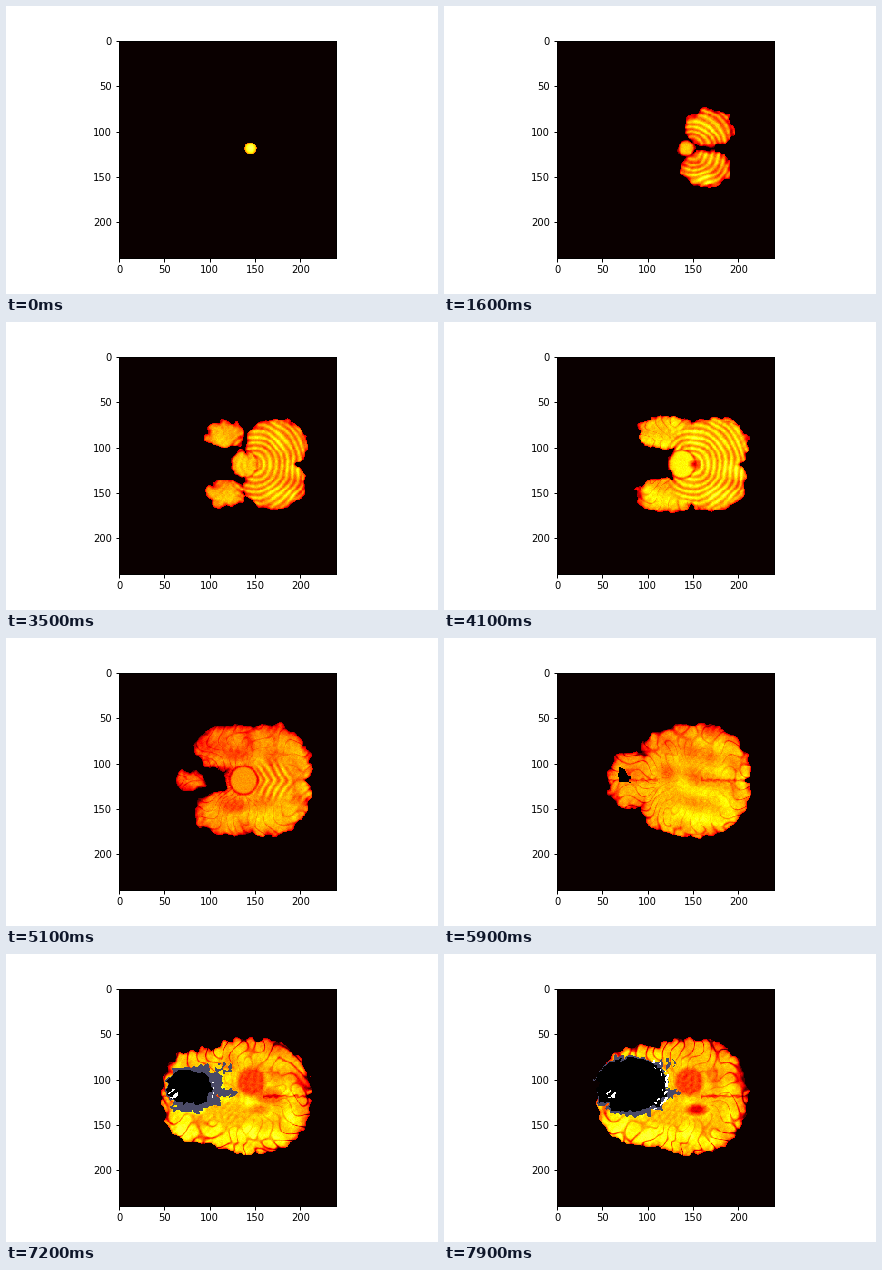
A matplotlib script that plays this animation: 432 px wide and 288 px high, repeating every 8 s.

```python
import numpy as np
import matplotlib.pyplot as plt
from matplotlib.animation import FuncAnimation

FRAMES, SIZE = 80, 240
LEFT, TOP, SCALE = 112.68, 34.56, 0.906  # image position on the stage
MID = 142.5                              # row of the midline
TAU = 2 * np.pi

idx = (np.arange(SIZE) + 0.5) * SCALE
X, Y = np.meshgrid(LEFT + idx, TOP + idx)
DY = np.abs(Y - MID)
RADIUS = np.hypot(X - 235, Y - MID)
THETA = np.arctan2(Y - MID, X - 235)


def waves(seed, length, u, v, count=18):
    """Return smooth drifting noise as a function of the slice number."""
    rng = np.random.default_rng(seed)
    a = rng.uniform(0, TAU, count)
    n = TAU / length * rng.uniform(0.75, 1.3, count)
    start = rng.uniform(0, TAU, count)
    rate = rng.normal(0, 0.14, count)
    phase = [w * (np.cos(b) * u + np.sin(b) * v) + s for w, b, s in zip(n, a, start)]
    return lambda k: sum(np.cos(p + r * k) for p, r in zip(phase, rate)) * np.sqrt(2 / count)


folds = waves(4, 18, THETA * 46 + 4 * np.sin(RADIUS / 6 + 3 * THETA), RADIUS * 0.8)
mottle = waves(7, 26, X, Y)
bumps = waves(9, 15, X, Y)
jagged = waves(11, 6, X, Y)


def ramp(k, a, b):
    f = np.clip((k - a) / (b - a), 0, 1)
    return f * f * (3 - 2 * f)


def mix(a, b, f):
    return a + (b - a) * f


def window(k, a, b, fade=4):
    return ramp(k, a, a + fade) * (1 - ramp(k, b - fade, b))


def glide(k, *keys):
    """Values at slice k between key rows (slice, value, ...)."""
    t, *cols = zip(*keys)
    return [np.interp(k, t, c) for c in cols]


def oval(cx, cy, rx, ry, power=2):
    """Approximate distance inside a superellipse, negative outside."""
    rho = (np.abs((X - cx) / rx) ** power + np.abs((Y - cy) / ry) ** power) ** (1 / power)
    return (1 - rho) * min(rx, ry)


def soft(depth, edge=3):
    return np.clip(depth / edge + 0.5, 0, 1)


def stem_shape(k):
    f = ramp(k, 0, 41)
    return mix(244, 237, f), MID, mix(6, 14, f), mix(6, 14, f)


def outline(k):
    """Depth below the surface of everything present in slice k."""
    parts = [oval(*stem_shape(k))]
    for side in (-1, 1):
        if 0 < k < 52:  # cerebellum
            cx, off, rx, ry = glide(k, (1, 262, 16, 3, 3), (9, 263, 20, 19, 16.5),
                                    (16, 263, 20, 25, 19), (28, 268, 19, 29, 24),
                                    (41, 269, 20, 33, 27))
            parts.append(oval(cx - 1.5 * side, MID + side * off, rx, ry))
        if k > 24:      # temporal lobes
            cx, off, rx, ry = glide(k, (25, 213, 28, 2, 3), (28, 214, 28, 5, 9),
                                    (41, 223, 31, 31, 17), (51, 226, 32, 37, 23),
                                    (64, 232, 25, 30, 25))
            parts.append(oval(cx, MID + side * off, rx, ry, 2.2))
    if k > 34:          # cerebrum
        parts.append(oval(*glide(k, (35, 266, MID, 30, 36), (41, 264, MID, 38, 46),
                                 (51, 262, MID, 43, 56), (64, 243, MID, 64, 58),
                                 (79, 246, MID, 57, 58)), 2.2))
    if k > 45:          # frontal lobes
        parts.append(oval(*glide(k, (46, 186, MID, 3, 2), (51, 185, MID, 15, 10),
                                 (66, 188, MID, 30, 44), (79, 203, MID, 50, 50)), 2.4))
    depth = np.max(parts, axis=0)
    depth += ramp(k, 0, 8) * (0.9 * bumps(k) + 0.2 * jagged(k))
    cleft = 7 * ramp(k, 8, 14) * (1 - ramp(k, 70, 76))
    return depth - cleft * (X > 270) * np.exp(-(DY / 2.5) ** 2)


def tissue(k):
    depth = outline(k)
    rough = jagged(k)
    grain = np.random.default_rng(k).normal(0, 0.015, X.shape) * ramp(k, 0, 3)

    # overall tone with a slowly turning brightness gradient
    tone = mix(0.87, 0.64, ramp(k, 0, 5)) + 0.05 * window(k, 34, 48) + 0.06 * ramp(k, 56, 70)
    tone -= 0.06 * window(k, 45, 60)
    val = tone + (0.035 * mottle(k) + 0.012 * rough) * ramp(k, 0, 3)
    turn = mix(TAU / 8, 3 * TAU / 8, ramp(k, 51, 79))
    slope = ((X - 235) * np.cos(turn) + (Y - MID) * np.sin(turn)) / 70
    val += 0.09 * ramp(k, 42, 50) * slope

    # cerebellar folia: rings that sharpen into chevrons
    bend = ramp(k, 42, 51)
    dx = X - 248
    rho = mix(np.hypot(dx, DY), dx + 0.6 * DY, bend)
    folia = soft(oval(265, MID, *[mix(44, 20, bend)] * 2), 8)
    folia *= ramp(k, 2, 6) * (1 - ramp(k, 53, 60)) * (1 - 0.6 * window(k, 19, 36, 6))
    val -= 0.09 * folia * (0.3 + np.sin(TAU * rho / mix(5.8, 7.5, bend) + 0.7 * mottle(k)))

    # cortical sulci, strongest near the surface
    sulci = np.exp(-(folds(k) / 0.33) ** 2) * np.exp(-np.maximum(depth, 0) / 18)
    val -= mix(0.16, 0.42, ramp(k, 50, 76)) * ramp(k, 34, 42) * (1 - folia) * sulci

    # brainstem disc with a dark border
    ball = oval(*stem_shape(k))
    on = window(k, 4, 57) * (1 - 0.8 * window(k, 17, 38, 7))
    val = mix(val, mix(0.68, 0.59, bend) + 0.06 * window(k, 34, 48), on * soft(ball))
    val -= 0.2 * on * np.exp(-(ball / 1.3) ** 2)

    def spot(start, end, level, *shape):
        nonlocal val
        val = mix(val, level + 0.02 * rough, 0.9 * window(k, start, end) * soft(oval(*shape), 5))

    spot(6, 21, 0.33, 268, MID, 10, 3)             # vermis
    spot(22, 35, 0.52, 260, MID, 11, 9)
    spot(34, 46, 0.28, 250, MID, 4, 3)             # fourth ventricle
    for side in (-1, 1):
        spot(22, 34, 0.42, 249, MID + 30 * side, 5, 10)
        spot(46, 58, 0.45, 229, MID + 26 * side, 11, 6)
    spot(58, 90, 0.43, 245, 128, 14, 14)           # deep nuclei
    spot(58, 90, 0.64, 222, 160, 22, 12)
    spot(58, 74, 0.40, 263, MID, 12, 8)
    spot(70, 90, 0.28, 252, 156, 9, 5)             # ventricle

    fissure = 0.22 * ramp(k, 54, 62) * (np.abs(X - 235) > 22)
    val -= fissure * np.exp(-((Y - MID - 0.5 * rough) / 1.2) ** 2)
    val -= 0.36 * np.exp(-np.maximum(depth, 0) / 1.9)
    val = np.clip(val + grain, 0.1, mix(0.9, 0.8, ramp(k, 0, 4)))
    return np.where(depth > 0, val, 0)


def labels(k):
    """Segmentation: 1 core, 2 swelling, 4 enhancing rim."""
    out = np.zeros(X.shape)
    if k >= 57:
        rough = jagged(k)
        edge = bumps(k) + 0.5 * rough
        swelling = oval(*glide(k, (57, 180, 139, 3, 3), (66, 187, 137, 20, 17),
                               (79, 188, 132, 36, 30)), 2.3)
        core = oval(*glide(k, (60, 178, 138, 1, 1), (66, 179, 137, 10, 9),
                           (79, 187, 131, 35, 26)), 2.3)
        grow = ramp(k, 61, 66)
        out[swelling + 1.4 * edge > 0] = 2
        if grow > 0:
            tail = oval(mix(217, 224, ramp(k, 66, 79)), 139, 11 * grow, 4 * grow)
            specks = oval(mix(214, 222, ramp(k, 66, 79)), mix(118, 110, ramp(k, 66, 79)),
                          9 * grow, 6 * grow)
            out[(tail + 0.8 * rough > 0) | ((specks > 0) & (rough > 0.3))] = 2
            out[core + edge > 0] = 1
        if k >= 68:
            out[(np.abs(core) < 3) & (X > 205) & (rough > 0.9)] = 4
            out[(oval(167, 140, 5, 5) > 0) & (rough > 0.5)] = 4
    return np.ma.masked_equal(out, 0)


plt.rcParams.update({"axes.linewidth": 1, "xtick.major.width": 1, "ytick.major.width": 1})
fig = plt.figure(figsize=(6, 4), dpi=72, facecolor="white")
fig.subplots_adjust(left=0.125, right=0.9, bottom=0.125, top=0.88)
ax = fig.add_subplot()
scan = ax.imshow(np.zeros((SIZE, SIZE)), cmap="hot", vmin=0, vmax=1,
                 interpolation="nearest")
mask = ax.imshow(labels(0), cmap="bone", vmin=1, vmax=4, interpolation="nearest")


def update(k):
    seg = labels(k)
    scan.set_data(tissue(k))
    mask.set_data(seg)
    if seg.count():
        mask.set_clim(seg.min(), seg.max())
    return scan, mask


anim = FuncAnimation(fig, update, frames=FRAMES, interval=100,
                     init_func=lambda: update(0), repeat=True, repeat_delay=0)
plt.show()
```
